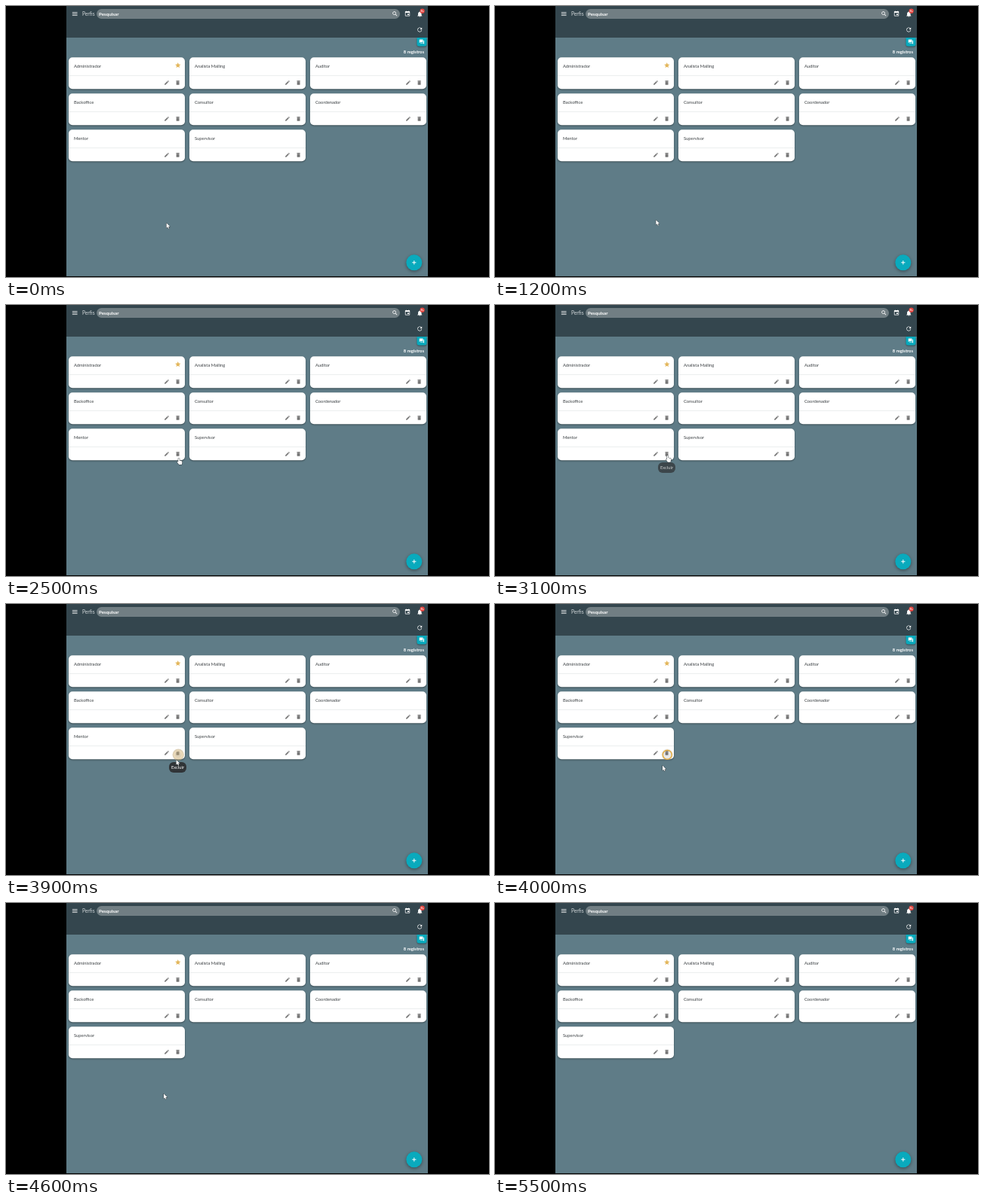
An HTML page with a canvas that plays this animation: 640 by 360 pixels, repeating every 8100 ms.

```html
<!DOCTYPE html>
<html lang="pt-BR">
<head>
<meta charset="utf-8">
<title>Perfis</title>
<style>
html, body { margin: 0; width: 100%; height: 100%; overflow: hidden; background: #000; }
canvas { display: block; width: 640px; height: 360px; }
</style>
</head>
<body>
<canvas id="stage" width="640" height="360"></canvas>
<script>
const ctx = document.getElementById('stage').getContext('2d');
const LOOP = 8100;
const STEP = 100;
const TEAL = '#09aabd';
const REMOVED_AT = 4000;
const CLICK = { x: 228.3, y: 200.2 };

// Icons on a 24-unit grid.
const icons = {
  menu: 'M3 18h18v-2H3zM3 13h18v-2H3zM3 6v2h18V6z',
  edit: 'M3 17.2V21h3.8L17.8 9.9 14 6.2zM20.7 7a1 1 0 0 0 0-1.4l-2.3-2.3a1 1 0 0 0-1.4 0L15.1 5.1l3.8 3.8z',
  trash: 'M6 19a2 2 0 0 0 2 2h8a2 2 0 0 0 2-2V7H6zM19 4h-3.5l-1-1h-5l-1 1H5v2h14z',
  star: 'M12 17.3 18.2 21 16.5 14 22 9.2 14.8 8.6 12 2 9.2 8.6 2 9.2 7.5 14 5.8 21z',
  search: 'M15.5 14h-.8l-.3-.3A6.5 6.5 0 1 0 13.7 14.4l.3.3v.8l5 5 1.5-1.5zM9.5 14a4.5 4.5 0 1 1 0-9 4.5 4.5 0 0 1 0 9z',
  event: 'M17 12h-5v5h5zM16 1v2H8V1H6v2H5a2 2 0 0 0-2 2v14a2 2 0 0 0 2 2h14a2 2 0 0 0 2-2V5a2 2 0 0 0-2-2h-1V1zM19 19H5V8h14z',
  bell: 'M12 22a2 2 0 0 0 2-2h-4a2 2 0 0 0 2 2zM18 16v-5c0-3-1.6-5.6-4.5-6.3V4a1.5 1.5 0 0 0-3 0v.7C7.6 5.4 6 8 6 11v5l-2 2v1h16v-1z',
  refresh: 'M17.6 6.4A8 8 0 1 0 19.7 14h-2.1A6 6 0 1 1 16.2 7.8L13 11h7V4z',
  chat: 'M21 6h-2v9H6v2a1 1 0 0 0 1 1h11l4 4V7a1 1 0 0 0-1-1zM17 12V3a1 1 0 0 0-1-1H3a1 1 0 0 0-1 1v14l4-4h10a1 1 0 0 0 1-1z'
};
for (const name in icons) icons[name] = new Path2D(icons[name]);

const arrow = new Path2D('M0 0V6.6L1.5 5.2 2.5 7.5 3.6 7 2.6 4.8H4.7z');
const hand = new Path2D('M0 .8Q.8-.4 1.5.8V3.6L5 4.5Q5.5 7 4.5 9.2H1L-1.5 5.8Q-1.2 4.7 0 5.6z');

// Pointer keys: time, x, y of the tip.
const pointerPath = [
  [1100, 212.6, 288.3], [1300, 214, 280], [1500, 220, 254], [1800, 228.3, 223.4],
  [2000, 229, 219], [2200, 229, 213], [2600, 228, 199.5], [3700, 228, 199.5],
  [3900, 225.6, 207], [4000, 222, 214.6], [4200, 215, 231], [4400, 211, 246],
  [4600, 209, 253.3], [5200, 209, 253.3], [5400, 205, 301]
];

const clamp = v => Math.max(0, Math.min(1, v));
const ramp = (t, from, to) => clamp((t - from) / (to - from));

function pointerAt(t) {
  let prev = pointerPath[0];
  for (const key of pointerPath) {
    if (t <= key[0]) {
      const k = key === prev ? 1 : ramp(t, prev[0], key[0]);
      return { x: prev[1] + (key[1] - prev[1]) * k, y: prev[2] + (key[2] - prev[2]) * k };
    }
    prev = key;
  }
  return { x: prev[1], y: prev[2] };
}

function box(x, y, w, h, r, color) {
  ctx.fillStyle = color;
  ctx.beginPath();
  ctx.roundRect(x, y, w, h, r);
  ctx.fill();
}

function disc(x, y, r, color) {
  ctx.fillStyle = color;
  ctx.beginPath();
  ctx.arc(x, y, r, 0, Math.PI * 2);
  ctx.fill();
}

function text(str, x, y, size, color, weight = 400, align = 'left') {
  ctx.font = `${weight} ${size}px Lato, sans-serif`;
  ctx.textAlign = align;
  ctx.fillStyle = color;
  ctx.fillText(str, x, y);
}

function icon(name, cx, cy, size, color) {
  ctx.save();
  ctx.translate(cx - size / 2, cy - size / 2);
  ctx.scale(size / 24, size / 24);
  ctx.fillStyle = color;
  ctx.fill(icons[name], 'evenodd');
  ctx.restore();
}

function withShadow(blur, dy, draw) {
  ctx.save();
  ctx.shadowColor = 'rgba(0,0,0,.4)';
  ctx.shadowBlur = blur;
  ctx.shadowOffsetY = dy;
  draw();
  ctx.restore();
}

function drawPage() {
  ctx.fillStyle = '#000';
  ctx.fillRect(0, 0, 640, 360);
  ctx.fillStyle = '#5f7c87';
  ctx.fillRect(80, 0, 479, 359);
  ctx.fillStyle = '#34464e';
  ctx.fillRect(80, 0, 479, 42);

  icon('menu', 91.2, 10.5, 9, '#fff');
  text('Perfis', 101, 12.7, 6.7, '#d5dadc');
  box(120, 4, 402, 13, 6.5, '#717e83');
  text('Pesquisar', 123, 12.5, 6.2, '#fff', 700);
  icon('search', 515.4, 10.4, 8.5, '#fff');
  icon('event', 532, 10.3, 8.5, '#fff');
  icon('bell', 548.3, 10.8, 9, '#fff');
  disc(551.6, 6.7, 3.1, '#e5453f');
  text('9+', 551.6, 8.2, 3.8, '#fff', 700, 'center');
  icon('refresh', 548.2, 31.5, 9, '#fff');

  withShadow(2, 1, () => box(544.5, 42, 13, 11.5, [0, 0, 3, 3], TEAL));
  icon('chat', 550.9, 47.7, 7.6, '#fff');
  text('8 registros', 554, 63.2, 5.8, '#fff', 700, 'right');

  withShadow(4, 1.5, () => disc(540.8, 340.8, 10.5, TEAL));
  ctx.fillStyle = '#fff';
  ctx.fillRect(538.2, 340.3, 5.2, 1);
  ctx.fillRect(540.3, 338.2, 1, 5.2);
}

function drawCard(name, index) {
  const x = 83 + (index % 3) * 160;
  const y = 68.3 + Math.floor(index / 3) * 48;
  withShadow(2, 1, () => box(x, y, 154, 42, 5, '#fff'));
  ctx.fillStyle = '#eceeef';
  ctx.fillRect(x, y + 23.7, 154, 1);
  text(name, x + 7, y + 13.8, 5.8, '#3c4144');
  icon('edit', x + 130, y + 33.6, 7.6, '#777');
  icon('trash', x + 144.6, y + 33.6, 7.8, '#777');
  if (index === 0) icon('star', x + 144.8, y + 10.4, 8.8, '#e3b65b');
}

function drawClick(t) {
  if (t < 3600 || t > 4300) return;
  const { x, y } = CLICK;
  const fade = 1 - ramp(t, 4000, 4400);
  ctx.save();
  ctx.globalAlpha = fade;
  const grown = ramp(t, 3500, 3800);
  disc(x, y, 3 + 4.7 * grown, t < REMOVED_AT ? 'rgba(190,163,112,.5)' : 'rgba(120,120,120,.16)');
  ctx.strokeStyle = t < REMOVED_AT ? 'rgba(238,220,184,.9)' : '#e3ae45';
  ctx.lineWidth = 1.5;
  ctx.beginPath();
  ctx.arc(x, y, 2.6 + 3.4 * ramp(t, 3600, 4000), 0, Math.PI * 2);
  ctx.stroke();
  ctx.restore();
}

function drawTooltip(t) {
  const shown = ramp(t, 2800, 3200);
  if (!shown || t >= REMOVED_AT) return;
  const y = 216 + ramp(t, 3100, 3300);
  ctx.save();
  ctx.globalAlpha = shown;
  box(216, y - 7, 23, 14, 6, '#303437');
  text('Excluir', 227.5, y + 2, 5.8, '#fff', 400, 'center');
  ctx.restore();
}

function drawPointer(t) {
  if (t >= 5500) return;
  const { x, y } = pointerAt(t);
  const shape = y < 204 ? hand : arrow;
  ctx.save();
  ctx.translate(x, y);
  ctx.lineJoin = 'round';
  ctx.lineWidth = 1;
  ctx.strokeStyle = '#30383c';
  ctx.stroke(shape);
  ctx.fillStyle = '#fff';
  ctx.fill(shape);
  ctx.restore();
}

function render(now) {
  const t = Math.floor((now % LOOP) / STEP) * STEP;
  const names = ['Administrador', 'Analista Mailing', 'Auditor', 'Backoffice',
    'Consultor', 'Coordenador', 'Mentor', 'Supervisor'];
  drawPage();
  names.filter(name => t < REMOVED_AT || name !== 'Mentor').forEach(drawCard);
  drawClick(t);
  drawTooltip(t);
  drawPointer(t);
}

const start = performance.now();
function loop() {
  render(performance.now() - start);
  requestAnimationFrame(loop);
}
loop();
</script>
</body>
</html>
```
